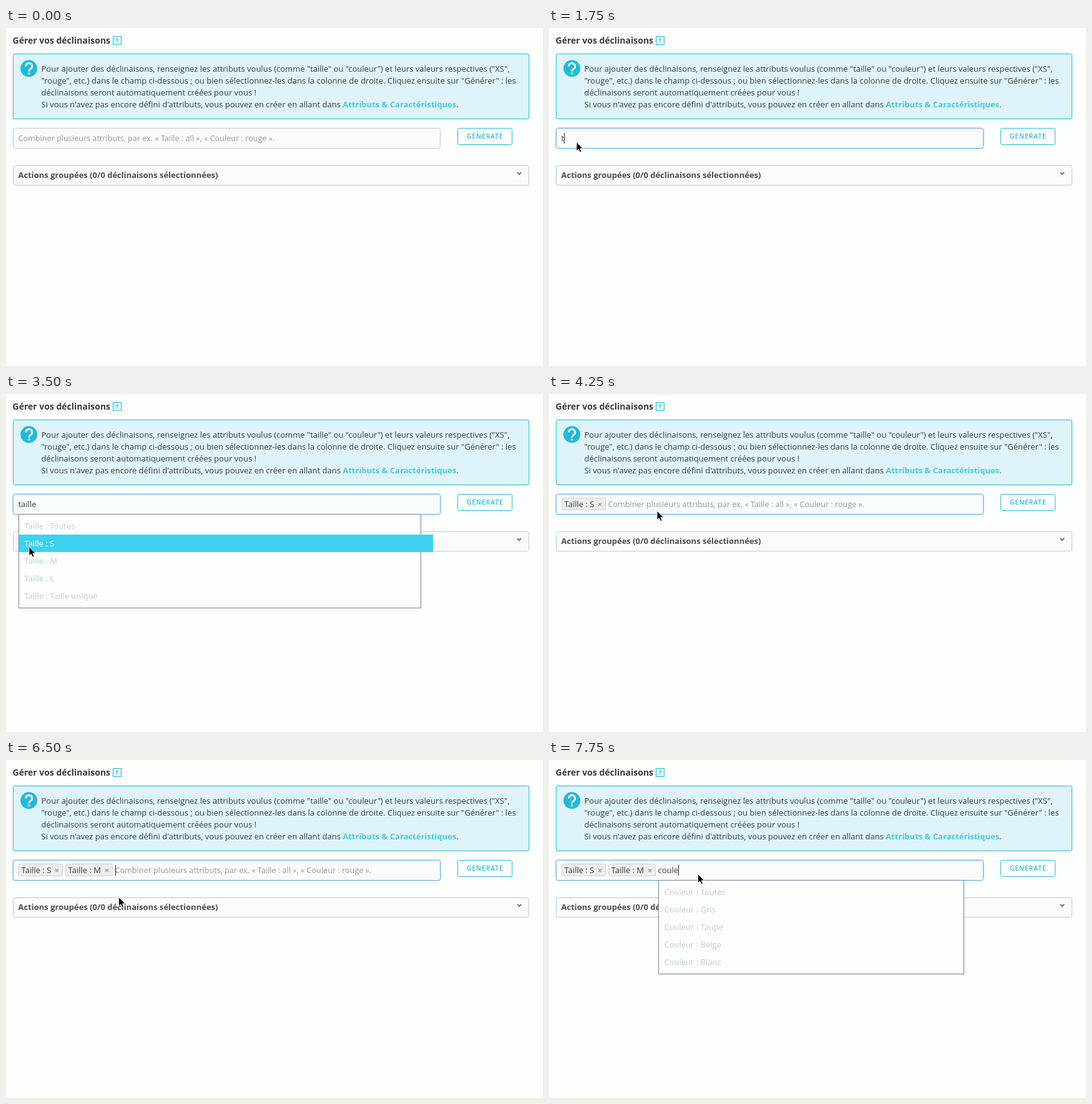
An HTML page for the animation above (8000 ms loop, 860 by 541 pixels).

```html
<!DOCTYPE html>
<html lang="fr">
<head>
<meta charset="utf-8">
<title>Gérer vos déclinaisons</title>
<style>
  html, body { margin: 0; width: 100%; height: 100%; overflow: hidden; background: #fdfefe; }
  svg { display: block; font: 13px "Open Sans", sans-serif; fill: #363a41; }
  .bold { font-weight: 700; }
  .panel { fill: #fafbfb; stroke: #bbcdd2; }
  .focus { stroke: #66afe9; filter: drop-shadow(0 0 1.5px #66afe9aa); }
  .accent { stroke: #25b9d7; }
  .hint { fill: #999; font-size: 12.65px; }
  .chip { fill: #eee; stroke: #d2d2d2; }
  .list { fill: #fefefe; stroke: #6c868e; }
  .item { fill: #bbcdd2; }
  .caret { stroke: #222; }
</style>
</head>
<body>
<svg width="860" height="541" viewBox="0 0 860 541">
  <text class="bold" x="10.5" y="25" font-size="14">Gérer vos déclinaisons</text>
  <rect class="accent" x="171.5" y="13.5" width="13" height="13" fill="#dff5f9"/>
  <text class="bold" x="178" y="23" font-size="9" text-anchor="middle" fill="#25b9d7">?</text>

  <rect class="accent" x="11.5" y="41.5" width="826" height="104" rx="2" fill="#dff4fa"/>
  <circle cx="36.7" cy="64.8" r="13.5" fill="#25b9d7"/>
  <path d="M31.8 61.5a5 4.9 0 1 1 8.2 3.5q-3.2 2.3-3.2 4.6" fill="none" stroke="#fff" stroke-width="2.7"/>
  <rect x="35.4" y="71.5" width="2.8" height="2.8" fill="#fff"/>
  <text x="56.5" y="70">Pour ajouter des déclinaisons, renseignez les attributs voulus (comme "taille" ou "couleur") et leurs valeurs respectives ("XS",</text>
  <text x="56.5" y="89">"rouge", etc.) dans le champ ci-dessous ; ou bien sélectionnez-les dans la colonne de droite. Cliquez ensuite sur "Générer" : les</text>
  <text x="56.5" y="108">déclinaisons seront automatiquement créées pour vous !</text>
  <text x="56.5" y="127">Si vous n'avez pas encore défini d'attributs, vous pouvez en créer en allant dans <tspan class="bold" fill="#4ac7e0">Attributs &amp; Caractéristiques</tspan>.</text>

  <rect class="accent" x="723.5" y="160.5" width="87" height="26" rx="2" fill="#fff"/>
  <text x="738" y="177" font-size="10" font-weight="600" letter-spacing="1.1" fill="#25b9d7">GENERATE</text>

  <rect class="panel" x="11.5" y="220.5" width="826" height="31" rx="3"/>
  <text class="bold" x="19.5" y="240" fill="#4a4d52">Actions groupées (0/0 déclinaisons sélectionnées)</text>
  <path d="M818.8 231l3.2 3.2 3.2-3.2" fill="none" stroke="#444" stroke-width="1.4"/>

  <rect id="field" class="panel" x="11.5" y="160.5" width="684" height="32" rx="3"/>
  <g id="live"></g>
  <path id="pointer" d="M0 0V14.5L3.3 11.4 5.5 16.6 8 15.5 5.8 10.4H10.3Z" fill="#000" stroke="#fff" stroke-width=".9"/>
</svg>
<script>
const STEP = 250, LOOP = 8000;
const HINT = 'Combiner plusieurs attributs, par ex. « Taille : all », « Couleur : rouge ».';
const CHIPS = [{ x: 20, w: 70, name: 'S' }, { x: 95, w: 75, name: 'M' }];
const INPUT_X = [20, 95, 175];
const options = (kind, names) => names.map(name => `${kind} : ${name}`);
const sizes = options('Taille', ['Toutes', 'S', 'M', 'L', 'Taille unique']);
const sizesLeft = sizes.filter(name => name !== 'Taille : S');
const colours = options('Couleur', ['Toutes', 'Gris', 'Taupe', 'Beige', 'Blanc']);

// Each entry changes only the named properties of the state.
const timeline = [
  [0, { pointer: null, focus: false, caret: false, chips: 0, typed: '', list: [], active: -1 }],
  [500, { pointer: [120, 222] }],
  [750, { pointer: [70, 196] }],
  [1000, { pointer: [44, 182.5] }],
  [1250, { caret: true }],
  [1500, { focus: true }],
  [1750, { typed: 't' }],
  [2000, { typed: 'ta', list: sizes }],
  [2250, { typed: 'tail' }],
  [2500, { typed: 'taill' }],
  [2750, { typed: 'taille' }],
  [3000, { pointer: [42, 205], active: 0 }],
  [3250, { pointer: [38, 232], active: 1, caret: false }],
  [3500, { pointer: [37, 244.5] }],
  [3750, { chips: 1, typed: '', list: [], active: -1, caret: true, pointer: [70, 230] }],
  [4000, { pointer: [173, 187] }],
  [4250, { caret: false }],
  [4750, { typed: 'ta', list: sizesLeft, caret: true }],
  [5000, { typed: 'tail' }],
  [5250, { typed: 'taille' }],
  [6000, { pointer: [176, 212], active: 0 }],
  [6250, { pointer: [180, 232], active: 1 }],
  [6500, { pointer: [180.5, 219.5], chips: 2, typed: '', list: [], active: -1 }],
  [6750, { pointer: [215, 198] }],
  [7000, { pointer: [238.5, 182.5] }],
  [7250, { typed: 'c' }],
  [7500, { typed: 'cou', list: colours }],
  [7750, { typed: 'coule' }],
];

const field = document.getElementById('field');
const live = document.getElementById('live');
const pointer = document.getElementById('pointer');

const text = (x, y, content, attrs = '') => `<text x="${x}" y="${y}" ${attrs}>${content}</text>`;
const rect = (x, y, w, h, attrs) => `<rect x="${x}" y="${y}" width="${w}" height="${h}" ${attrs}/>`;

function chip({ x, w, name }) {
  const cross = x + w - 8.5;
  return rect(x + .5, 166.5, w, 19, 'class="chip" rx="2"') +
    text(x + 4.5, 181, `Taille : ${name}`) +
    `<path d="M${cross - 2.5} 174.3l5 5m0-5l-5 5" stroke="#aaa" stroke-width="1.8"/>`;
}

function dropdown(x, list, active) {
  if (!list.length) return '';
  const items = list.map((name, i) => {
    const y = 197 + i * 28, on = i === active;
    return (on ? rect(x + 1, y, 683 - x, 28, 'fill="#3ed2f0"') : '') +
      text(x + 9.5, y + 19, name, on ? 'fill="#fff"' : 'class="item"');
  });
  return rect(x + .5, 192.5, 664 - x, list.length * 28 + 10, 'class="list"') + items.join('');
}

function draw(time) {
  const state = Object.assign({}, ...timeline.filter(([at]) => at <= time).map(entry => entry[1]));
  const { chips, typed, list, active, caret, focus } = state;
  const x = INPUT_X[chips];
  field.setAttribute('class', focus ? 'panel focus' : 'panel');
  live.innerHTML = CHIPS.slice(0, chips).map(chip).join('') +
    text(x - .5, 181, typed || HINT, typed ? 'id="typed"' : 'class="hint"') +
    dropdown(x, list, active);
  if (caret) {
    const width = typed ? document.getElementById('typed').getComputedTextLength() : 0;
    const caretX = Math.floor(x + width) + .5;
    live.insertAdjacentHTML('beforeend', `<path class="caret" d="M${caretX} 168V185"/>`);
  }
  pointer.style.display = state.pointer ? '' : 'none';
  if (state.pointer) pointer.setAttribute('transform', `translate(${state.pointer})`);
}

let shown = -1;
function tick() {
  const time = Math.floor(performance.now() % LOOP / STEP) * STEP;
  if (time !== shown) draw(shown = time);
  requestAnimationFrame(tick);
}
tick();
</script>
</body>
</html>
```
